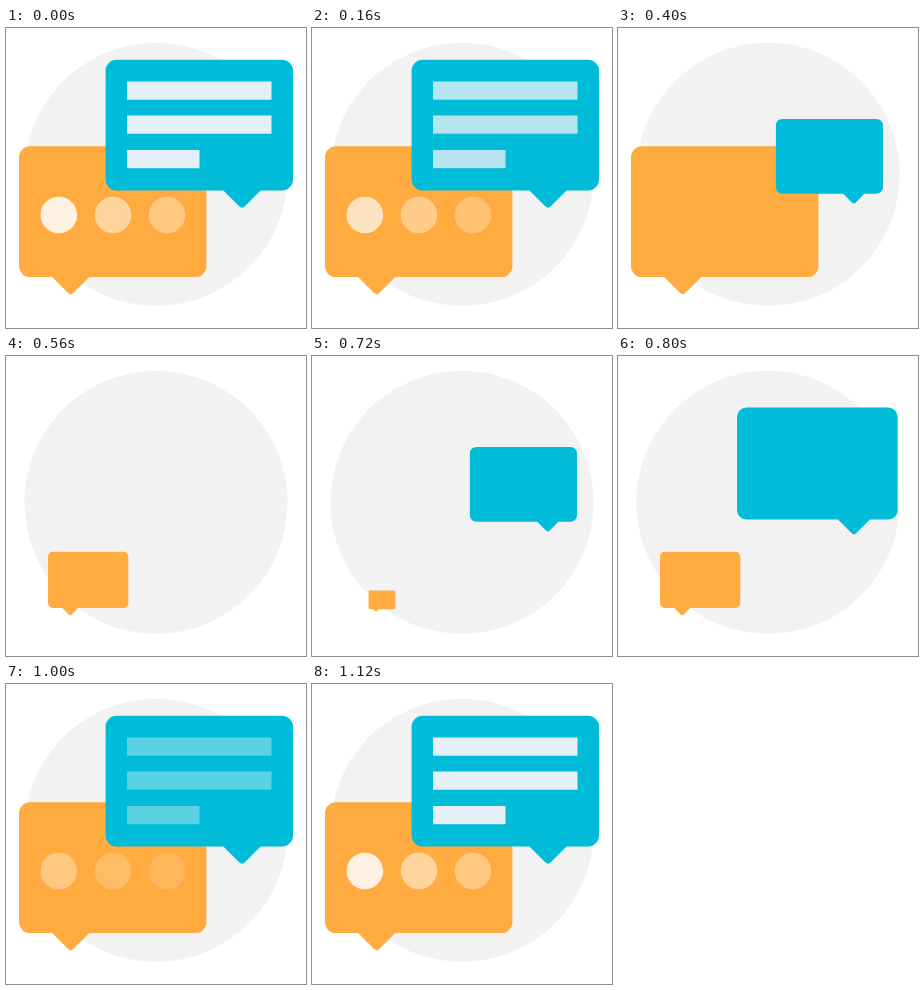
An HTML page with a canvas that plays this animation: 300x300 px, repeating every 2.52 s.

```html
<!DOCTYPE html>
<html lang="en">
<head>
<meta charset="utf-8">
<title>Chat bubbles</title>
<style>
html, body { margin: 0; width: 100%; height: 100%; overflow: hidden; background: #fff; }
canvas { display: block; width: 300px; height: 300px; }
</style>
</head>
<body>
<canvas id="stage" width="300" height="300"></canvas>
<script>
const ctx = document.getElementById('stage').getContext('2d');
const LOOP = 2520, STEP = 40;

const ORANGE = { x: 13, y: 118.3, tip: 64.7, pivot: [63.8, 254], color: '#ffab40' };
const BLUE = { x: 99.6, y: 31.7, tip: 236, pivot: [235.6, 170], color: '#00bcd8' };
const BARS = [[53.5, 144.5], [87.5, 144.5], [122, 72.5]];
const DOTS = [[52.8, '#fcf2df'], [107, '#ffd59d'], [161, '#ffc77f']];

const ramp = (t, start, length) => Math.min(1, Math.max(0, (t - start) / length));

// 1 at rest, falling to 0 from `out` and rising again from `back`
const dip = (t, out, back, length) => 1 - ramp(t, out, length) + ramp(t, back, length);

function disc(x, y, r, color) {
  ctx.fillStyle = color;
  ctx.beginPath();
  ctx.arc(x, y, r, 0, Math.PI * 2);
  ctx.fill();
}

function bubble({ x, y, tip, pivot: [px, py], color }, scale) {
  if (scale <= 0.001) return;
  const w = 187.4, h = 130.8, r = 11, tail = 18.6;
  const right = x + w, bottom = y + h;
  ctx.save();
  ctx.translate(px, py);
  ctx.scale(scale, scale);
  ctx.translate(-px, -py);
  ctx.fillStyle = color;
  ctx.beginPath();
  ctx.moveTo(x + r, y);
  ctx.arcTo(right, y, right, bottom, r);
  ctx.arcTo(right, bottom, x, bottom, r);
  ctx.lineTo(tip + tail, bottom);
  ctx.arcTo(tip, bottom + tail, tip - tail, bottom, 4);
  ctx.lineTo(tip - tail, bottom);
  ctx.arcTo(x, bottom, x, y, r);
  ctx.arcTo(x, y, right, y, r);
  ctx.closePath();
  ctx.fill();
  ctx.restore();
}

function draw(t) {
  const content = dip(t, 120, 920, 200);
  ctx.globalAlpha = 1;
  ctx.fillStyle = '#fff';
  ctx.fillRect(0, 0, 300, 300);
  disc(150, 146.3, 131.6, '#f2f2f2');

  bubble(ORANGE, dip(t, 400, 680, 280));
  ctx.globalAlpha = content;
  for (const [x, color] of DOTS) disc(x, 187, 18.3, color);

  ctx.globalAlpha = 1;
  bubble(BLUE, dip(t, 280, 560, 280));
  ctx.globalAlpha = content;
  ctx.fillStyle = '#e4eff6';
  for (const [y, w] of BARS) ctx.fillRect(121, y, w, 18.2);
}

function tick() {
  const t = performance.now() % LOOP;
  draw(Math.floor(t / STEP) * STEP);
  requestAnimationFrame(tick);
}
tick();
</script>
</body>
</html>
```
